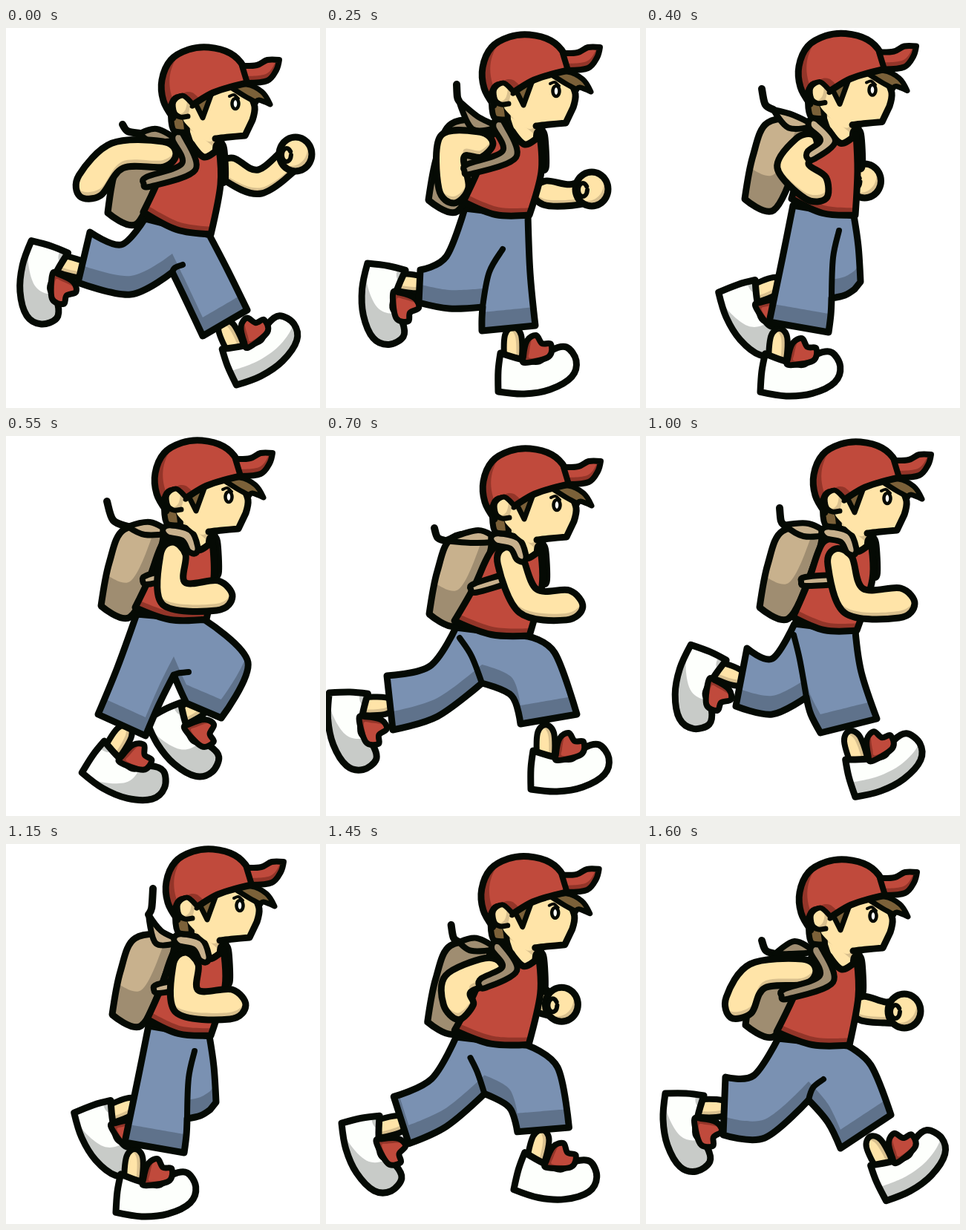
Animation, 423 px wide and 512 px high, one loop 1.75 s. Source, as an HTML page with a canvas:

```html
<!DOCTYPE html>
<html lang="en">
<head>
<meta charset="utf-8">
<title>Running boy</title>
<style>
html, body { margin: 0; width: 100%; height: 100%; overflow: hidden; background: #fff; }
canvas { display: block; width: 423px; height: 512px; }
</style>
</head>
<body>
<canvas id="stage" width="423" height="512"></canvas>
<script>
const INK = '#050a04', SKIN = '#ffe4a8', SKIN_DARK = '#d9c08e', RED = '#c04a3c', RED_DARK = '#933529',
  BLUE = '#7a91b2', BLUE_DARK = '#5f728b', TAN = '#c8b18d', TAN_DARK = '#9f8d71',
  WHITE = '#fdfffc', GREY = '#c8cbc8', HAIR = '#7b6139';

// "x,y x,y!" to points; "!" marks a corner.
const points = text => text.split(' ').map(p =>
  [...p.replace('!', '').split(',').map(Number), p.endsWith('!') ? 1 : 0]);

// Mixes numbers, arrays and objects of the same form.
const mix = (a, b, t) => typeof a === 'number' ? a + (b - a) * t
  : Array.isArray(a) ? a.map((v, i) => mix(v, b[i], t))
  : Object.fromEntries(Object.keys(a).map(k => [k, mix(a[k], b[k], t)]));

const move = (pts, dx, dy) => pts.map(([x, y, ...rest]) => [x + dx, y + dy, ...rest]);
const oval = (x, y, rx, ry) => Array.from({ length: 12 }, (_, i) =>
  [x + rx * Math.cos(i * Math.PI / 6), y + ry * Math.sin(i * Math.PI / 6)]);

// Head and shoe are rigid; bag, straps and shirt hang from the head.
const HEAD = {
  neck: points('242,120 285,146 289,163 270,182 252,162'),
  hair: points('222,118! 240,120 244,140! 226,138'),
  face: points('236,100! 260,90 324,75! 328,96 335,106 332,124! 322,145! 285,147 275,153 262,148 248,135 238,122'),
  jaw: points('327,86 335,106 332,124! 322,145! 300,147 282,149'),
  fringe: points('303,80! 324,76 345,86 356,103! 341,97 337,100! 322,92'),
  sideburn: points('255,101! 277,88! 265,121!'),
  cap: points('225,121! 212,98 210,70 222,43 246,29 273,26 302,34 320,52 325,74! 297,81 275,89 251,104! 240,94 228,95 222,108'),
  ear: points('247,95 234,91 224,102 227,116 238,121 246,114'),
  earLine: points('250,101 238,91 226,99 227,114 235,120 245,119'),
  brim: points('318,51! 338,50 352,43 368,43! 364,57 352,71 325,74!'),
  brow: points('301,92 307,90 313,95')
};
const SHOE = points('-17,6! 10,14 35,17 52,2 72,-2 85,16 79,38 50,55 15,61 -20,58! -20,30');
const TONGUE = points('14,10 19,-11 31,-18 39,-7 51,-6 48,11 16,19');
const BAG = points('168,146 148,191 137,249! 176,264 207,200 219,147');
const TUCKED = points('262,195 250,212 240,215');
const STRAP = { worn: points('228,148 252,154 261,172'), ring: points('232,148 246,187 192,207') };
const PANTS_CORNERS = [0, 2, 3, 5, 7, 8, 10];

// pants: back waist, down to the rear cuff, crotch, front cuff, front waist; last the end of the fold.
// feet: ankle x,y and turn in degrees. back: 1 when the near arm is swung behind.
function pose(head, back, pants, feet, arm, tail, far) {
  pants = points(pants);
  return {
    head, back, feet, arm: points(arm), tail: points(tail),
    fold: pants.pop(),
    pants: pants.map(([x, y], i) => [x, y, PANTS_CORNERS.includes(i) ? 1 : 0]),
    far: far ? points(far) : move(TUCKED, ...head)
  };
}

const reach = pose([0, 0], 1,
  '187,257 155,292 113,275 97,343 168,359 224,329 240,362 265,415 325,380 298,325 274,279 238,319',
  [[85, 321, 105], [304, 420, -25]], '212,170 150,172 113,212', '157,130 180,142', '300,190 342,207 390,170');
const land = pose([1, -17], 1,
  '187,243 162,308 127,326 125,370 166,378 211,376 210,392 210,408 282,401 275,330 272,253 238,298',
  [[111, 344, 97], [252, 432, 0]], '208,157 170,160 172,216', '176,76 179,98', '294,222 330,225 358,217');
const pass = pose([-9, -20], 0,
  '176,240 150,312 124,375 188,404 206,362 226,322 236,345 243,360 290,380 326,305 268,248 246,318',
  [[150, 415, 32], [249, 371, 60]], '225,160 226,212 285,215', '136,88 164,122');
const push = pose([2, -9], 0,
  '175,258 140,310 82,323 90,396 150,378 210,333 250,350 262,388 338,375 308,292 272,270 180,272',
  [[63, 364, 88], [296, 418, 0]], '247,166 272,222 326,228', '146,124 160,141');
const drop = pose([16, -18], 0,
  '200,253 170,300 136,286 121,364 170,375 216,352 222,375 235,400 311,381 290,318 282,263 199,268',
  [[108, 320, 110], [283, 425, -18]], '261,168 280,222 342,225', '180,97 186,120');
const stand = pose([6, -19], 0,
  '192,245 178,315 160,402 240,416 243,392 244,370 262,366 275,358 283,348 280,300 274,259 254,279',
  [[153, 359, 68], [172, 440, 4]], '242,163 244,212 303,216', '198,60 192,95');
const stride = pose([-3, -5], 1,
  '178,262 145,312 107,314 104,392 160,396 219,345 245,375 262,410 330,365 303,298 272,272 239,317',
  [[84, 356, 90], [315, 420, -27]], '212,172 150,178 125,217', '156,130 174,148', '290,221 322,227 348,225');

// The pose p on the legs of q, which are shifted.
const withLegs = (p, q, dx, dy) => ({
  ...p, pants: move(q.pants, dx, dy), feet: move(q.feet, dx, dy), fold: move([q.fold], dx, dy)[0]
});

const leap = {
  ...withLegs(push, reach, 4, 2), head: [4, 0],
  arm: points('250,176 285,214 389,196'), tail: move(push.tail, 2, 9), far: move(TUCKED, 4, 0)
};
const cross = withLegs(mix(land, pass, .5), stand, 6, -6);
const swing = withLegs(mix(stand, stride, .3), pass, 4, 6);
const kick = withLegs(mix(stand, stride, .7), mix(pass, push, .78), 0, 6);

const timeline = [
  [0, reach], [150, mix(reach, land, .5)], [250, land], [400, cross], [550, pass], [700, push],
  [850, leap], [1000, drop], [1150, stand], [1300, swing], [1450, kick], [1600, stride]
];

const ctx = document.getElementById('stage').getContext('2d');
ctx.lineJoin = ctx.lineCap = 'round';

// Smooth path through the points, straightened at corners.
function curve(pts, open) {
  const path = new Path2D(), n = pts.length;
  const at = i => pts[open ? Math.max(0, Math.min(n - 1, i)) : (i + n) % n];
  const handle = (i, k, sign) =>
    at(i)[k] + (at(i)[2] ? 0 : sign * (at(i + 1)[k] - at(i - 1)[k]) / 6);
  path.moveTo(pts[0][0], pts[0][1]);
  for (let i = 0; i < (open ? n - 1 : n); i++)
    path.bezierCurveTo(handle(i, 0, 1), handle(i, 1, 1),
      handle(i + 1, 0, -1), handle(i + 1, 1, -1), at(i + 1)[0], at(i + 1)[1]);
  if (!open) path.closePath();
  return path;
}

// Outline of a bent tube with a radius at each joint and round ends.
function limb(joints, radii) {
  const n = joints.length, left = [], right = [];
  const dir = i => {
    const a = joints[i], b = joints[i + 1], d = Math.hypot(b[0] - a[0], b[1] - a[1]) || 1;
    return [(b[0] - a[0]) / d, (b[1] - a[1]) / d];
  };
  joints.forEach(([x, y], i) => {
    const a = dir(Math.max(0, i - 1)), b = dir(Math.min(n - 2, i));
    const sx = a[0] + b[0], sy = a[1] + b[1], len = Math.hypot(sx, sy) || 1;
    const r = radii[i], m = r / Math.max(.8, len / 2), nx = -sy / len * m, ny = sx / len * m;
    left.push([x + nx, y + ny]);
    right.unshift([x - nx, y - ny]);
  });
  const cap = (i, d, sign) =>
    [joints[i][0] + sign * d[0] * radii[i], joints[i][1] + sign * d[1] * radii[i]];
  return [...left, cap(n - 1, dir(n - 2), 1), ...right, cap(0, dir(0), -1)];
}

// Cel shading: the light tone is the same shape, moved by (dx, dy) inside the dark one.
function part(pts, light, width = 9, dark = light, dx = 0, dy = 0) {
  const path = curve(pts);
  ctx.fillStyle = dark;
  ctx.fill(path);
  if (dark !== light) {
    ctx.save();
    ctx.clip(path);
    ctx.translate(dx, dy);
    ctx.fillStyle = light;
    ctx.fill(path);
    ctx.restore();
  }
  if (width) ink(path, width);
}

function ink(path, width) {
  ctx.strokeStyle = INK;
  ctx.lineWidth = width;
  ctx.stroke(path);
}
const line = (pts, width) => ink(curve(pts, true), width);

function drawFoot([x, y, turn]) {
  ctx.save();
  ctx.translate(x, y);
  ctx.rotate(turn * Math.PI / 180);
  part(limb([[0, 16], [0, -18]], [11, 11]), SKIN, 8, SKIN_DARK, -8, 2);
  if (turn > 20) part(SHOE, WHITE, 9, GREY, -42, 0);
  else part(SHOE, WHITE, 9, GREY, 3, turn < -10 ? -20 : 0);
  part(TONGUE, RED, 8, RED_DARK, 8, -6);
  ctx.restore();
}

function drawPants({ pants, fold }) {
  part(pants, BLUE, 9, BLUE_DARK, 0, -25);
  const crotch = pants[5];
  line([crotch, [mix(crotch[0], fold[0], .4) - 2, mix(crotch[1], fold[1], .6)], fold], 8);
}

// Runs from the collar to the waist of the pants.
function drawShirt({ head: [x, y], pants }) {
  const back = pants[0], front = pants[10];
  const hem = [back[0] - 2, back[1] - 9, 1], shoulder = [222 + x, 162 + y];
  const armpit = [289 + x, 211 + y], collar = [287 + x, 162 + y, 1];
  part(limb([[collar[0] + 1, collar[1]], [armpit[0] + 1, armpit[1] - 8]], [6, 6]), TAN_DARK, 8);
  part([shoulder, [250 + x, 156 + y, 1], [267 + x, 174 + y], collar, armpit,
    [front[0] + 2, front[1] - 1, 1], [(hem[0] + front[0]) / 2, (hem[1] + front[1]) / 2 + 8], hem,
    [(hem[0] + shoulder[0]) / 2, (hem[1] + shoulder[1]) / 2 + 4]], RED, 9, RED_DARK, 4, -10);
}

function drawBag({ head, back, tail: [tip, knot] }) {
  const sag = BAG.map(([x, y, c], i) => [x, y + (i % 5 ? 0 : 40 * back * (tip[1] > 110)), c]);
  const body = move(sag, ...head);
  part(body, back > .5 ? TAN_DARK : TAN, 9, TAN_DARK, 0, -48);
  line([tip, [mix(tip[0], knot[0], .3), mix(tip[1], knot[1], .75)], knot], 10);
  part([[...knot.slice(0, 2), 1], ...move(points('203,136 227,150 196,153'), ...head)],
    back > .5 ? TAN_DARK : TAN, 8);
}

function drawFarArm([shoulder, wrist, hand]) {
  part(limb([shoulder, wrist, hand], [16, 14, 15]), SKIN, 9, SKIN_DARK, 0, -8);
  part(oval(hand[0], hand[1], 22, 23), SKIN, 9, SKIN_DARK, -6, -7);
  line(oval(hand[0] - 12, hand[1] + 1, 6, 9), 6);
}

function drawHead([x, y]) {
  ctx.save();
  ctx.translate(x, y);
  part(HEAD.hair, HAIR, 8);
  part(HEAD.face, SKIN, 0);
  line(HEAD.jaw, 9);
  part(HEAD.fringe, HAIR, 7);
  part(HEAD.sideburn, HAIR, 7);
  part(HEAD.cap, RED, 9, RED_DARK, 11, -7);
  part(HEAD.ear, SKIN, 0, SKIN_DARK, -4, -5);
  line(HEAD.earLine, 7);
  part(HEAD.brim, RED, 8, RED_DARK, -2, -9);
  part(oval(309, 102, 4.5, 7), WHITE, 4.5);
  line(HEAD.brow, 4);
  ctx.restore();
}

function draw(p) {
  ctx.fillStyle = '#fff';
  ctx.fillRect(0, 0, 423, 512);
  p.feet.forEach(drawFoot);
  drawPants(p);
  part(move(HEAD.neck, ...p.head), SKIN, 8, SKIN_DARK, -8, 12);
  drawBag(p);
  drawFarArm(p.far);
  drawShirt(p);
  if (p.back < .5) {
    const [, , , , edge] = move(BAG, ...p.head), [x, y] = p.arm[0];
    part(limb([[edge[0] - 8, edge[1] + 14], [x, y + 25]], [6, 6]), TAN, 8);
  }
  part(limb(p.arm, [17, 17, 20]), SKIN, 9, SKIN_DARK, -1, -9);
  part(limb(move(mix(STRAP.worn, STRAP.ring, p.back), ...p.head), [8, 8, 7]),
    p.back > .5 ? TAN_DARK : TAN, 8);
  drawHead(p.head);
}

let shown;
function tick() {
  const t = performance.now() % 1750;
  const next = timeline.filter(([start]) => start <= t).pop()[1];
  if (next !== shown) draw(shown = next);
  requestAnimationFrame(tick);
}
tick();
</script>
</body>
</html>
```
